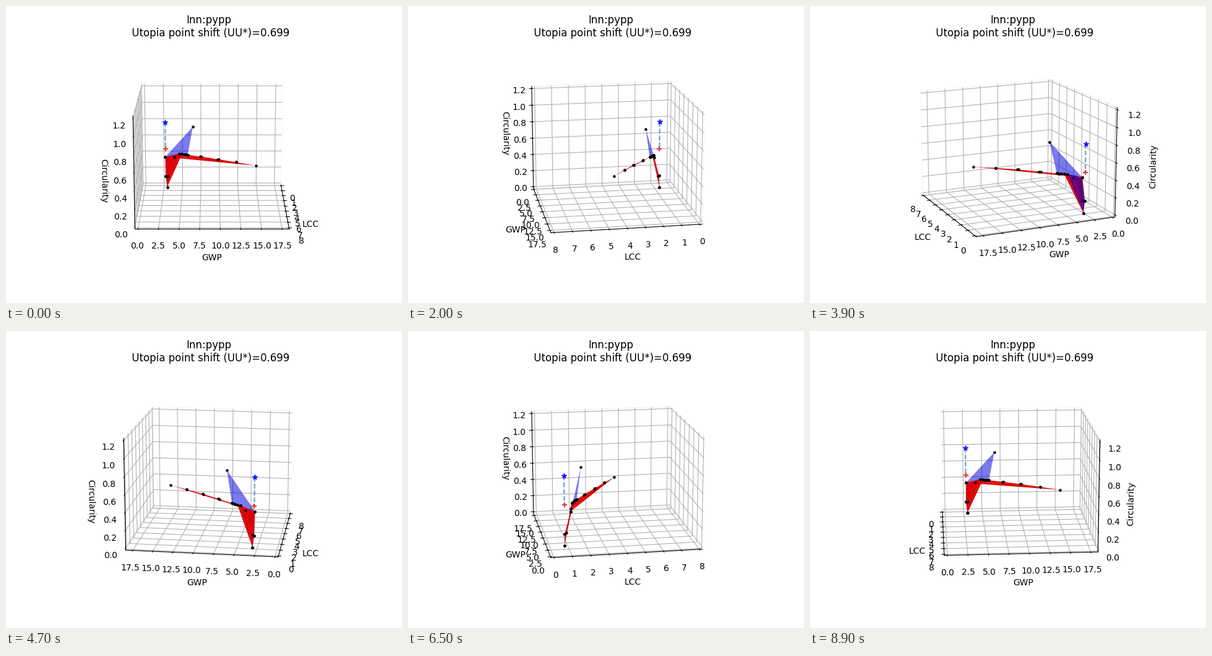
These frames come from a looping animation (640x480 px, 9000 ms). A matplotlib script:

```python
import numpy as np
import matplotlib.pyplot as plt
from matplotlib.animation import FuncAnimation

FRAMES, INTERVAL = 90, 100
ELEV = 15
LIMITS = np.array([8, 18, 1.2])      # LCC, GWP, Circularity
BOX = np.array([8, 8, 6]) / 7        # relative size of the plot box


def between(p, q, t):
    return tuple(np.array(p) + t * (np.array(q) - p))


# Trade-off points: a steep group at low impact, then a long thin tail
low, mid_a, mid_b = (0.776, 2.974, 0.004), (0.787, 2.79, 0.141), (0.879, 3.05, 0.146)
corner, inner = (1.123, 2.787, 0.396), (1.2, 3.99, 0.398)
knee, bend = (1.296, 4.65, 0.445), (1.644, 5.78, 0.45)
steps = [between(knee, bend, t) for t in (0.33, 0.61, 0.8)]
tail = [(2.17, 7.47, 0.458), (2.915, 9.72, 0.467), (3.665, 12.13, 0.472)]
end, peak = (4.417, 14.54, 0.473), (1.945, 6.49, 0.803)

front = np.array([low, mid_a, mid_b, corner, inner, knee, *steps, bend, *tail, end])
other = np.array([peak, (0.785, 2.99, 0.004), mid_a, corner, knee, *steps, bend,
                  (2.22, 7.63, 0.459), (2.96, 9.86, 0.467), tail[2]])
utopia = np.array([(0.776, 2.79, 0.802)])
shifted = np.array([(0.776, 2.79, 0.473)])

# Triangles index into the front points, with the peak appended last
base = [(0, 1, 2), (1, 3, 2), (2, 3, 4), (0, 2, 4), (0, 4, 5), (3, 5, 4)]
base += [(3, k + 1, k) for k in range(5, 9)]
red_tris = base + [(0, 5, 6), (3, 10, 9), (3, 11, 10), (3, 13, 11), (11, 13, 12)]
blue_tris = base + [(3, 14, 9)]
mesh = np.vstack([front, peak])

fig = plt.figure(figsize=(6.4, 4.8), dpi=100)
ax = fig.add_subplot(projection="3d", computed_zorder=False)


def surface(tris, color, alpha):
    return ax.plot_trisurf(*mesh.T, triangles=tris, color=color, alpha=alpha,
                           shade=False, linewidth=0.2)


def dots(pts, color, marker, size):
    return ax.scatter(*pts.T, c=color, marker=marker, s=size, alpha=0.8,
                      depthshade=False)


ax.plot(*np.vstack([utopia, shifted]).T, "--", color="tab:blue", alpha=0.7)
layers = [
    (surface(blue_tris, (0, 0, 0.86), 0.52), mesh[np.unique(blue_tris)]),
    (surface(red_tris, (0.867, 0, 0), 1), front),
    (dots(utopia, "blue", "*", 36), utopia),
    (dots(shifted, "red", "+", 36), shifted),
    (dots(other, "black", ".", 24), other),
    (dots(front, "black", ".", 24), front),
]

pad = LIMITS / 48
ax.set(xlim=(-pad[0], LIMITS[0] + pad[0]),
       ylim=(-pad[1], LIMITS[1] + pad[1]),
       zlim=(-pad[2], LIMITS[2] + pad[2]),
       xlabel="LCC", ylabel="GWP", zlabel="Circularity")
ax.set_title("Inn:pypp\n Utopia point shift (UU*)=0.699")
for axis in (ax.xaxis, ax.yaxis, ax.zaxis):
    axis.pane.fill = False


def nearness(pts, azim):
    """Depth of the point closest to the camera."""
    a, e = np.radians([azim, ELEV])
    view = np.array([np.cos(e) * np.cos(a), np.cos(e) * np.sin(a), np.sin(e)])
    return round(float(np.max((pts / LIMITS - 0.5) * BOX @ view)), 6)


def update(i):
    azim = i * 360 / FRAMES + 1e-6   # keeps edge-on views unambiguous
    ax.view_init(elev=ELEV, azim=azim)
    ordered = sorted(layers, key=lambda layer: nearness(layer[1], azim))
    for z, (artist, _) in enumerate(ordered, start=4):
        artist.set_zorder(z)
    return []


anim = FuncAnimation(fig, update, frames=FRAMES, interval=INTERVAL,
                     init_func=lambda: update(0), repeat=True, repeat_delay=0)
plt.show()
```
